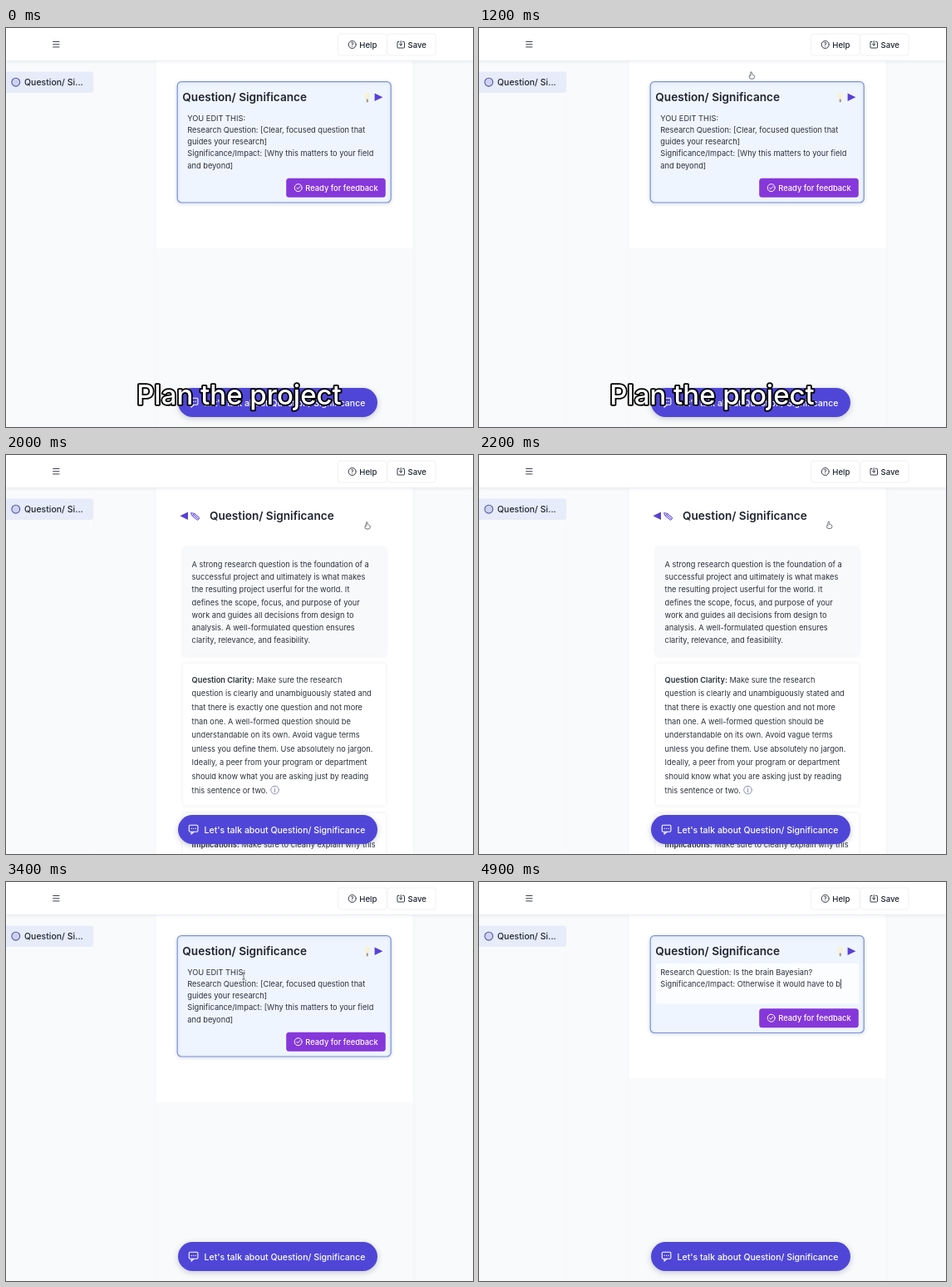
Recreate the animation shown at these times as an HTML page with a canvas. Size 562 by 480 pixels, loop 5000 ms.

```html
<!DOCTYPE html>
<html lang="en">
<head>
<meta charset="utf-8">
<title>Research planner</title>
<style>
html, body { margin: 0; width: 100%; height: 100%; overflow: hidden; background: #f9fafb; }
canvas { display: block; width: 562px; height: 480px; }
</style>
</head>
<body>
<canvas id="stage"></canvas>
<script>
const W = 562, H = 480, LOOP = 5000, LINE = 14.25, BODY = 9.25;
const HELP_IN = 2000, HELP_OUT = 3000, FOCUS = 4000, CUT = 4500;
const INK = '#2b303b', DARK = '#1f2430', PURPLE = '#5a3fd6';
const TITLE = 'Question/ Significance';
const canvas = document.getElementById('stage');
const dpr = window.devicePixelRatio || 1;
canvas.width = W * dpr;
canvas.height = H * dpr;
const c = canvas.getContext('2d');

const PROMPT = [
  'YOU EDIT THIS:',
  'Research Question: [Clear, focused question that',
  'guides your research]',
  'Significance/Impact: [Why this matters to your field',
  'and beyond]'
];
const ANSWER1 = 'Is the brain Bayesian?';
const ANSWER2 = 'Otherwise it would have to b';
const INTRO = [
  'A strong research question is the foundation of a',
  'successful project and ultimately is what makes',
  'the resulting project userful for the world. It',
  'defines the scope, focus, and purpose of your',
  'work and guides all decisions from design to',
  'analysis. A well-formulated question ensures',
  'clarity, relevance, and feasibility.'
];
const CLARITY = [
  ' Make sure the research',
  'question is clearly and unambiguously stated and',
  'that there is exactly one question and not more',
  'than one. A well-formed question should be',
  'understandable on its own. Avoid vague terms',
  'unless you define them. Use absolutely no jargon.',
  'Ideally, a peer from your program or department',
  'should know what you are asking just by reading',
  'this sentence or two.'
];

const easeOut = k => 1 - (1 - k) ** 3;
const easeInOut = k => k < 0.5 ? 4 * k ** 3 : 1 - 4 * (1 - k) ** 3;
const progress = (t, from, to) => Math.max(0, Math.min(1, (t - from) / (to - from)));

// Pointer moves: to the arrow, to the back arrow, into the text, along the first line
const MOVES = [
  { from: 1000, to: 1750, x: 435, y: 85, ease: easeOut },
  { from: 2000, to: 2800, x: 224, y: 76, ease: easeInOut },
  { from: 3000, to: 3400, x: 286, y: 113, ease: easeInOut },
  { from: 4050, to: 4350, x: 217, y: 105, ease: easeInOut }
];

function pointer(t) {
  if (t < MOVES[0].from || t >= CUT) return null;
  return MOVES.reduce((p, m) => {
    const k = m.ease(progress(t, m.from, m.to));
    return { x: p.x + (m.x - p.x) * k, y: p.y + (m.y - p.y) * k };
  }, { x: 163, y: 14 });
}

function text(s, x, y, size, weight = 400, color = INK) {
  c.font = `${weight} ${size}px Inter, "Liberation Sans", sans-serif`;
  c.fillStyle = color;
  c.fillText(s, x, y);
  return c.measureText(s).width;
}

function box(x, y, w, h, r, fill, stroke, width = 1) {
  c.beginPath();
  c.roundRect(x, y, w, h, r);
  if (fill) { c.fillStyle = fill; c.fill(); }
  if (stroke) { c.strokeStyle = stroke; c.lineWidth = width; c.stroke(); }
}

function raised(alpha, blur, dy, ...args) {
  c.save();
  c.shadowColor = `rgba(40,50,100,${alpha})`;
  c.shadowBlur = blur * dpr;
  c.shadowOffsetY = dy * dpr;
  box(...args);
  c.restore();
}

function line(color, width, ...points) {
  c.strokeStyle = color;
  c.lineWidth = width;
  c.lineCap = c.lineJoin = 'round';
  c.beginPath();
  for (const [x, y] of points) c.lineTo(x, y);
  c.stroke();
}

function oval(x, y, rx, ry, fill, stroke, width) {
  c.beginPath();
  c.ellipse(x, y, rx, ry, 0, 0, Math.PI * 2);
  if (fill) { c.fillStyle = fill; c.fill(); }
  if (stroke) { c.strokeStyle = stroke; c.lineWidth = width; c.stroke(); }
}

function centered(s, x, y, size, weight, color) {
  c.textAlign = 'center';
  text(s, x, y, size, weight, color);
  c.textAlign = 'left';
}

function triangle(x, y, w) {
  c.fillStyle = PURPLE;
  c.beginPath();
  c.moveTo(x, y - 4.7);
  c.lineTo(x + w, y);
  c.lineTo(x, y + 4.7);
  c.fill();
}

function backdrop(bottom) {
  c.fillStyle = '#f9fafb';
  c.fillRect(0, 0, W, H);
  c.fillStyle = '#f6f7f9';
  c.fillRect(105, 40, 1, H);
  raised(0.05, 5, 0, 180.5, 30, 309, H, 0, '#f9fafb');
  c.fillStyle = '#fff';
  c.fillRect(180.5, 40, 309, bottom - 40);
}

function header() {
  raised(0.1, 4, 1, 0, -10, W, 49, 0, '#fff');
  for (let i = 0; i < 3; i++) line('#3b404a', 1, [56.5, 16.5 + i * 3.2], [64, 16.5 + i * 3.2]);
  box(399.5, 7, 58.5, 26, 3, '#fff', '#f1f2f4');
  box(459, 7, 58, 26, 3, '#fff', '#f1f2f4');

  oval(416.7, 20, 4.5, 4.5, null, DARK, 0.9);
  centered('?', 416.7, 22.6, 7, 500, DARK);
  text('Help', 425.3, 23.6, 9.6, 500, DARK);

  box(471, 16.5, 8.5, 7.5, 0.8, null, DARK, 0.9);
  c.fillStyle = '#fff';
  c.fillRect(473.4, 15.5, 3.7, 2);
  line(DARK, 0.9, [475.2, 15.5], [475.2, 21]);
  line(DARK, 0.9, [473.3, 19.2], [475.2, 21], [477.1, 19.2]);
  text('Save', 483.5, 23.6, 9.6, 500, DARK);
}

function sidebar() {
  box(-4, 52.5, 109, 25.5, 3, '#e6ecf9');
  oval(11.8, 65.2, 4.9, 4.9, '#cdd3ef', '#5a55a5', 1.1);
  text('Question/ Si...', 22, 69, 10.5, 500, DARK);
}

function pill() {
  raised(0.25, 7, 2, 207, 433, 240, 35, 17.5, '#4f46d8');
  box(220.3, 445.3, 10.6, 8, 1.2, null, '#fff', 1.1);
  line('#fff', 1.1, [223, 453.5], [223, 456.2], [226, 453.5]);
  for (let i = 0; i < 3; i++) oval(223.1 + i * 2.5, 449.4, 0.65, 0.65, '#fff');
  text(`Let's talk about ${TITLE}`, 238.6, 454.6, 10.5, 500, '#fff');
}

function bulb() {
  oval(434.8, 82, 3.2, 4.4, '#f7f1d8');
  box(433.7, 85.4, 2.2, 4, 0.8, '#a89a8c');
}

// Card text at time t, with the caret row when typing
function content(t) {
  if (t < CUT) return { rows: PROMPT, size: 5 };
  const typed = (s, from, to) => s.slice(0, Math.ceil(s.length * progress(t, from, to)));
  const first = 'Research Question: ' + typed(ANSWER1, CUT, 4700);
  if (t < 4700) return { rows: [first, ...PROMPT.slice(3)], size: 3, caret: 0 };
  return { rows: [first, 'Significance/Impact: ' + typed(ANSWER2, 4700, 4900)], size: 3, caret: 1 };
}

function card(t, { rows, size, caret }, p) {
  const cut = (5 - size) * LINE;
  const hover = t >= 1700 && t < HELP_IN;
  c.save();
  c.translate(hover ? -4 * progress(t, 1700, 1800) : 0, 0);
  raised(0.16, 4, 1, 206.2, 64.7, 257, 145.3 - cut, 5, '#eff5fe', '#7893de', 1.2);
  if (hover) box(425.5, 70.5, 32.5, 24.5, 3, '#dfe4f4');
  text(TITLE, 212.3, 88, 13.6, 600, DARK);
  bulb();
  triangle(443.6, 83.2, 9.8);

  if (t >= FOCUS) box(213, 98, 244, 77 - cut, 3, '#fcfdff');
  if (t >= MOVES[3].from && t < CUT) {
    const left = Math.max(218.3, p.x);
    c.fillStyle = '#c6d3ef';
    c.fillRect(left, 101, 294 - left, 14);
  }
  rows.forEach((row, i) => {
    const y = 111.6 + i * LINE;
    const w = text(row, 218.3, y, BODY);
    if (i === caret) {
      c.fillStyle = DARK;
      c.fillRect(218.3 + w, y - 9, 0.8, 11.5);
    }
  });

  const top = 180.7 - cut;
  box(337.2, top, 119.6, 23, 3.5, '#8637da');
  oval(351.7, top + 11.5, 4.5, 4.5, null, '#fff', 1);
  line('#fff', 1, [349.7, top + 11.6], [351.2, top + 13], [353.8, top + 10]);
  text('Ready for feedback', 360.3, top + 15, 9.35, 500, '#fff');
  c.restore();
}

function pencil(x, y) {
  c.save();
  c.translate(x, y);
  c.rotate(0.68);
  box(-3.5, -1.9, 8.5, 3.8, 1, '#e9e6fb', PURPLE, 0.9);
  line(PURPLE, 0.9, [-3.5, -1.9], [-7, 0], [-3.5, 1.9]);
  line(PURPLE, 0.9, [-3, 0], [4.5, 0]);
  c.restore();
}

function help() {
  triangle(219, 73.2, -9.6);
  pencil(228, 74);
  text(TITLE, 245, 78.2, 13.6, 600, DARK);

  raised(0.1, 4, 0, 213, 112, 244, 129.5, 3, '#f8f9fb');
  INTRO.forEach((row, i) => text(row, 223.6, 134.8 + i * 15.25, BODY));

  raised(0.1, 4, 0, 213, 251, 244, 170.5, 3, '#fff');
  CLARITY.forEach((row, i) => {
    const y = 273.8 + i * 16.6;
    const lead = i ? 0 : text('Question Clarity:', 223.6, y, BODY, 600);
    text(row, 223.6 + lead, y, BODY);
  });
  oval(323.5, 403, 4.8, 4.8, null, '#6c77a8', 0.8);
  centered('i', 323.5, 405.8, 7.5, 500, '#6c77a8');

  raised(0.1, 4, 0, 213, 431, 244, 80, 3, '#fff');
  const lead = text('Implications:', 223.6, 471.7, BODY, 600);
  text(' Make sure to clearly explain why this', 223.6 + lead, 471.7, BODY);
}

function caption() {
  const s = 'Plan the project', x = 280.5, y = 452.5;
  c.font = '500 33px Inter, "Liberation Sans", sans-serif';
  c.lineJoin = 'round';
  c.lineWidth = 3.6;
  c.strokeStyle = '#000';
  c.textAlign = 'center';
  c.strokeText(s, x, y);
  centered(s, x, y, 33, 500, '#fff');
}

function hand(x, y) {
  const edge = '#5a5c64';
  box(x - 3, y - 0.8, 6.2, 4.8, 2, '#fff', edge, 0.9);
  box(x - 1.7, y - 4.2, 1.8, 5.5, 0.9, '#fff', edge, 0.8);
  c.fillStyle = '#fff';
  c.fillRect(x - 1.2, y - 0.6, 3, 2.5);
}

function beam(x, y) {
  line('#4a4d57', 0.8, [x, y - 3.6], [x, y + 3.6]);
  for (const end of [-4, 4]) line('#4a4d57', 0.8, [x - 1.4, y + end], [x + 1.4, y + end]);
}

function draw(t) {
  const helping = t >= HELP_IN && t < HELP_OUT;
  const state = content(t), p = pointer(t);
  c.setTransform(dpr, 0, 0, dpr, 0, 0);
  backdrop(helping ? H : 265 - (5 - state.size) * LINE);
  if (helping) help();
  else card(t, state, p);
  sidebar();
  header();
  pill();
  if (t < HELP_IN) caption();
  if (p) (t > 3250 ? beam : hand)(p.x, p.y);
}

const start = performance.now();
function tick() {
  draw((performance.now() - start) % LOOP);
  requestAnimationFrame(tick);
}
tick();
</script>
</body>
</html>
```
